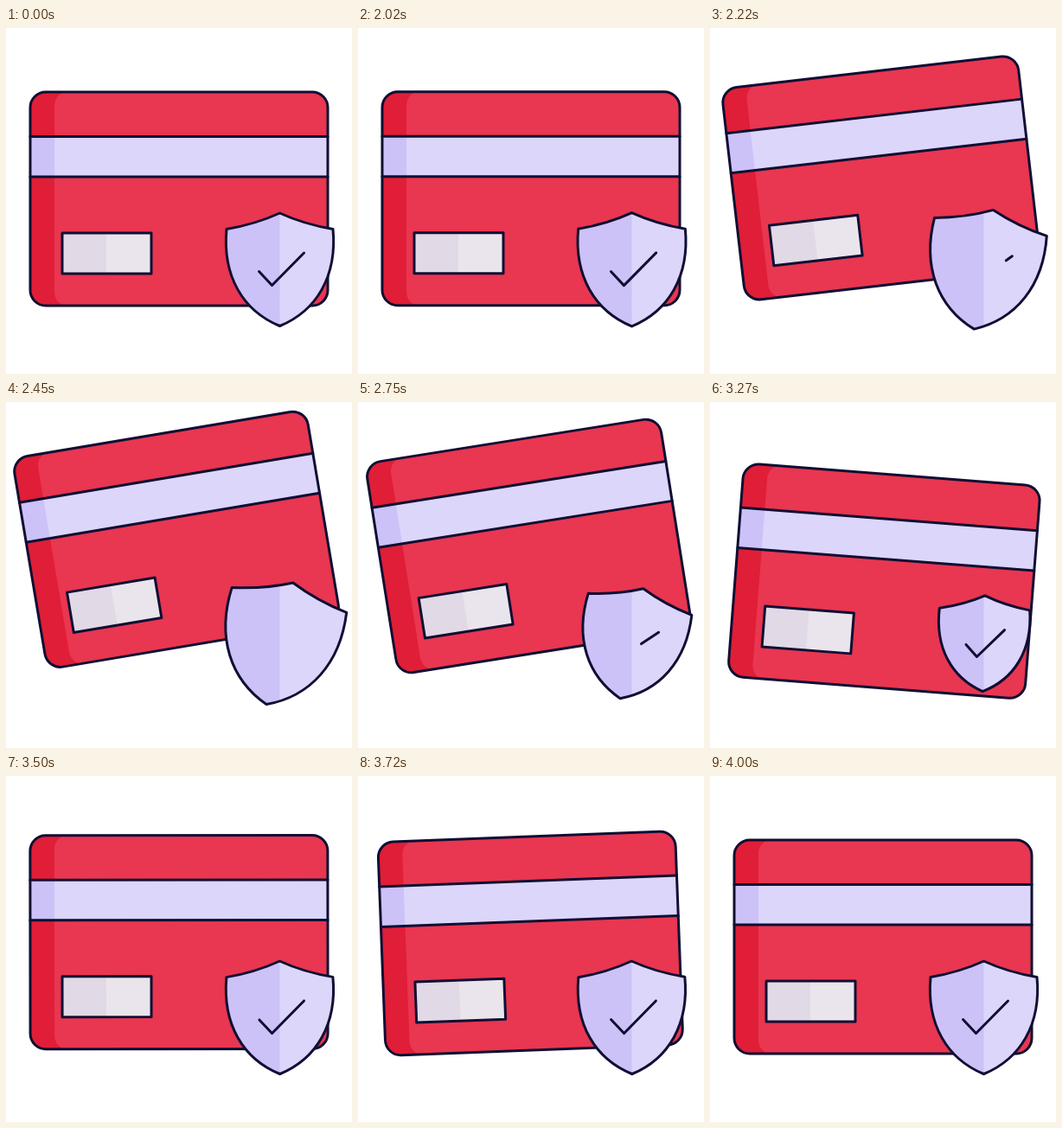
Animation, 400 px wide and 400 px high, one loop 4.02 s. Source, as an HTML page:

```html
<!DOCTYPE html>
<html lang="en">
<head>
<meta charset="utf-8">
<title>Secure card</title>
<style>
html, body { margin: 0; height: 100%; overflow: hidden; background: #fff; }
svg { display: block; width: 100%; height: 100%; }
.line {
  fill: none; stroke: #100f33; stroke-width: 3;
  stroke-linejoin: round; stroke-linecap: round;
}
#shield .line { vector-effect: non-scaling-stroke; }
</style>
</head>
<body>
<svg viewBox="0 0 400 400">
  <defs>
    <path id="shape" d="M316.5 214Q288 227 255 232.5C250 287 274 327 316.5 344.5C359 327 383 287 378 232.5Q345 227 316.5 214Z"/>
    <clipPath id="clip"><use id="mask" href="#shape"/></clipPath>
  </defs>
  <g id="card">
    <rect x="28" y="74" width="344" height="247" rx="18" fill="#e01e37"/>
    <path d="M70 74H354A18 18 0 0 1 372 92V303A18 18 0 0 1 354 321H70A14 16 0 0 1 56 305V90A14 16 0 0 1 70 74Z" fill="#e93651"/>
    <path d="M28 125.5H372V172H28Z" fill="#dcd6fb"/>
    <path d="M28 125.5H56V172H28Z" fill="#ccc2f7"/>
    <path d="M65 237H168V284H65Z" fill="#eae5ec"/>
    <path d="M65 237H116V284H65Z" fill="#e1d9e5"/>
    <rect class="line" x="28" y="74" width="344" height="247" rx="18"/>
    <path class="line" d="M28 125.5H372M28 172H372M65 237H168V284H65Z"/>
  </g>
  <!-- the two tones stay put while the outline turns -->
  <g clip-path="url(#clip)">
    <path d="M200 180H400V380H200Z" fill="#dcd6fb"/>
    <path d="M200 180H316.5V380H200Z" fill="#ccc2f7"/>
  </g>
  <g id="shield">
    <path class="line" d="M316.5 214Q288 227 255 232.5C250 287 274 327 316.5 344.5C359 327 383 287 378 232.5Q345 227 316.5 214Z"/>
    <path id="check" class="line" d="M344.5 260L307.5 297.5L280 268"/>
  </g>
</svg>
<script>
const LOOP = 4020, RESET = 4000, CHECK = 74.6;
const $ = id => document.getElementById(id);

// Damped spring from 0 to 1; `half` is half a period, `over` its first overshoot.
function spring(s, half, over) {
  if (s <= 0) return 0;
  const decay = -Math.log(over) / Math.PI, a = Math.PI * s / half;
  return 1 - Math.exp(-decay * a) * (Math.cos(a) + decay * Math.sin(a));
}

// Swells, then dips deeper, then returns to 1.
function pulse(u) {
  return u > 0 && u < 1 ? 1 + (0.062 + 0.155 * u) * Math.sin(2 * Math.PI * u) : 1;
}

function draw(t) {
  const lift = -33 * (spring(t - 2005, 450, 0.18) - spring(t - 2705, 440, 0.45));
  const tilt = -9 * (spring(t - 2020, 430, 0.06) - spring(t - 2808, 440, 0.5));
  $('card').setAttribute('transform', `translate(0 ${lift}) rotate(${tilt} 200 215)`);

  const turn = 12.1 * (spring(t - 2020, 450, 0.02) - spring(t - 2735, 290, 0.37));
  const size = pulse((t - 2000) / 1480);
  const pose = `translate(316.5 279) rotate(${turn}) scale(${size}) translate(-316.5 -279)`;
  $('shield').setAttribute('transform', pose);
  $('mask').setAttribute('transform', pose);

  // The tick slides along its path, past its resting place and back.
  const end = CHECK * (1 - spring(t - 2020, 370, 0.01) + spring(t - 2655, 370, 0.11));
  const from = Math.max(0, end - CHECK), length = Math.max(0, end - from);
  const check = $('check').style;
  check.visibility = length > 1.5 ? 'visible' : 'hidden';
  // Unscaled strokes measure dashes on screen.
  check.strokeDasharray = `${length * size} 999`;
  check.strokeDashoffset = -from * size;
}

const start = performance.now();
function frame() {
  const t = (performance.now() - start) % LOOP;
  draw(t < RESET ? t : 0);
  requestAnimationFrame(frame);
}
frame();
</script>
</body>
</html>
```
